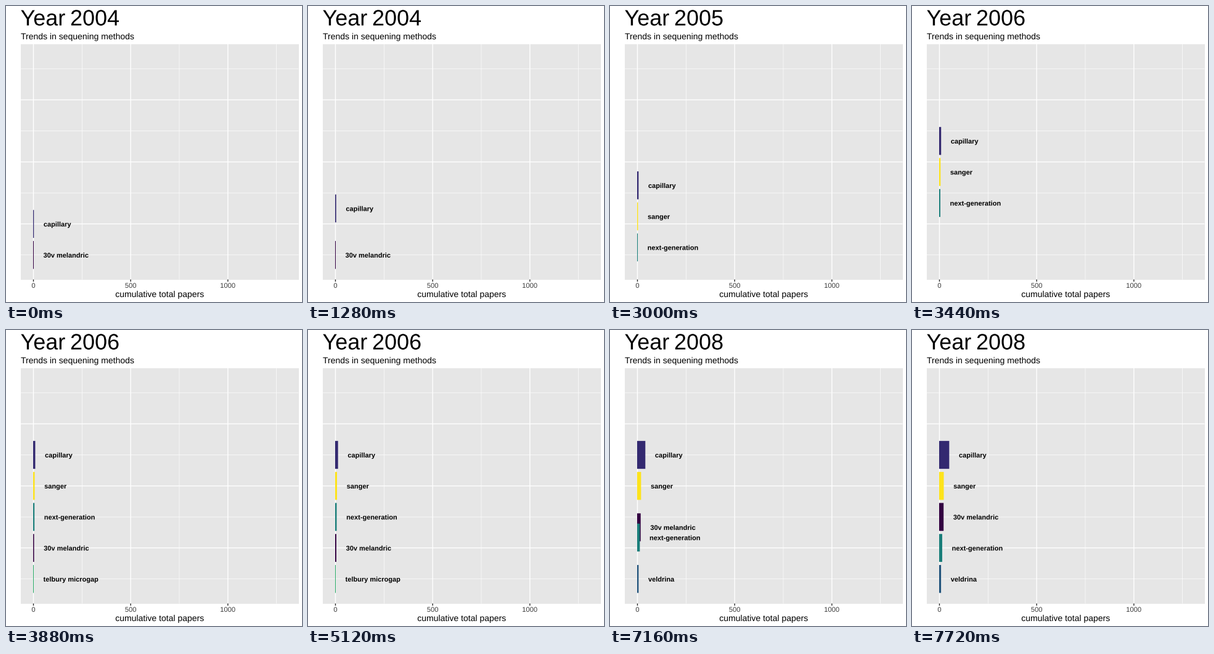
These frames come from a looping animation (480 px wide and 480 px high, 8 s). A matplotlib script:

```python
import matplotlib.pyplot as plt
from matplotlib.animation import FuncAnimation
from matplotlib.patches import PathPatch, Rectangle
from matplotlib.textpath import TextPath
from matplotlib.transforms import Affine2D

SIZE, DPI = 480, 100
FRAMES, INTERVAL = 200, 40
MOVE = 32                        # frames per transition
MOVE_STARTS = (16, 65, 114, 161)

LEFT, RIGHT, TOP, BOTTOM = 24, 474.5, 62, 443.5
X_ZERO, X_UNIT = 44.5, 0.3153
ROW_ONE, ROW_STEP = 403.7, 50.3
BAR_HEIGHT = 0.9 * ROW_STEP
LABEL_GAP = 50

MELANDRIC, MICROGAP, VELDRINA = "30v melandric", "telbury microgap", "veldrina"
COLORS = {
    MELANDRIC: "#330041",
    "capillary": "#332970",
    VELDRINA: "#22547c",
    "next-generation": "#1a7e7a",
    MICROGAP: "#29ab67",
    "sanger": "#fde31b",
}

# Cumulative papers per year, best ranked first.
STATES = [
    (2004, {"capillary": 2, MELANDRIC: 1}),
    (2005, {"capillary": 5, "sanger": 2, "next-generation": 1}),
    (2006, {"capillary": 9, "sanger": 6, "next-generation": 5,
            MELANDRIC: 3, MICROGAP: 1}),
    (2007, {"capillary": 21, "sanger": 11, "next-generation": 8,
            MELANDRIC: 7, VELDRINA: 1}),
    (2008, {"capillary": 50, "sanger": 22, MELANDRIC: 21,
            "next-generation": 14, VELDRINA: 8}),
]

fig = plt.figure(figsize=(SIZE / DPI, SIZE / DPI), dpi=DPI, facecolor="white")
ax = fig.add_axes([0, 0, 1, 1])
ax.set_xlim(0, SIZE)
ax.set_ylim(SIZE, 0)
ax.axis("off")


def x_pos(value):
    return X_ZERO + X_UNIT * value


def y_pos(row):
    return ROW_ONE - ROW_STEP * (row - 1)


def add_line(xs, ys, width, color="white"):
    ax.plot(xs, ys, color=color, lw=width * 72 / DPI,
            solid_capstyle="butt", zorder=1, snap=False)


def add_text(x, y, text, size, weight="normal", color="black", center=False):
    path = TextPath((0, 0), text, size=size,
                    prop={"family": "Liberation Sans", "weight": weight})
    if center:
        box = path.get_extents()
        x -= (box.x0 + box.x1) / 2
    place = Affine2D().scale(1, -1).translate(x, y) + ax.transData
    return ax.add_patch(PathPatch(path, fc=color, lw=0, transform=place, zorder=4))


def add_bar(name, value, row):
    left, right = 44, max(45, x_pos(value) + 0.1)
    return ax.add_patch(Rectangle((left, y_pos(row) - BAR_HEIGHT / 2),
                                  right - left, BAR_HEIGHT, fc=COLORS[name],
                                  lw=0, zorder=3, snap=False))


def draw_background():
    ax.add_patch(Rectangle((LEFT, TOP), RIGHT - LEFT, BOTTOM - TOP,
                           fc="#e6e6e6", lw=0, zorder=0))
    for width, values, rows in ((0.68, (250, 750, 1250), (1, 3, 5, 7)),
                                (1.36, (0, 500, 1000), (2, 4, 6))):
        for row in rows:
            add_line([LEFT, RIGHT], [y_pos(row)] * 2, width)
        for value in values:
            add_line([x_pos(value)] * 2, [TOP, BOTTOM], width)
    for value in (0, 500, 1000):
        add_line([x_pos(value)] * 2, [BOTTOM, BOTTOM + 3.5], 1.36, "#252525")
        add_text(x_pos(value), 457, str(value), 11.2, color="#3f3f3f", center=True)
    add_text(23.5, 31.5, "Year", 36)
    add_text(24, 54, "Trends in sequening methods", 14)
    add_text((LEFT + RIGHT) / 2, 472, "cumulative total papers", 14, center=True)


def ease(t):
    return 4 * t ** 3 if t < 0.5 else 1 - 4 * (1 - t) ** 3


def ranked(counts):
    return {name: (value, len(counts) - i)
            for i, (name, value) in enumerate(counts.items())}


def scene(frame):
    """Return the year and the (value, row) of each visible bar."""
    index = sum(frame >= start + MOVE for start in MOVE_STARTS)
    year, counts = STATES[index]
    bars = ranked(counts)
    if index < len(MOVE_STARTS) and frame > MOVE_STARTS[index]:
        t = (frame - MOVE_STARTS[index]) / MOVE
        next_year, next_counts = STATES[index + 1]
        goal = ranked(next_counts)
        k = ease(t)
        bars = {name: tuple(a + (b - a) * k
                            for a, b in zip(now, goal.get(name, now)))
                for name, now in bars.items()}
        if t > 0.5:
            year = next_year
    return year, bars


moving = []


def update(frame):
    while moving:
        moving.pop().remove()
    year, bars = scene(frame)
    moving.append(add_text(104, 31.5, str(year), 36))
    for name in sorted(bars):
        value, row = bars[name]
        moving.append(add_bar(name, value, row))
        moving.append(add_text(x_pos(value + LABEL_GAP), y_pos(row) + 4.2,
                               name, 11, "bold"))
    return moving


draw_background()
animation = FuncAnimation(fig, update, frames=FRAMES, interval=INTERVAL,
                          init_func=lambda: update(0), repeat=True,
                          repeat_delay=0, blit=False)
plt.show()
```
